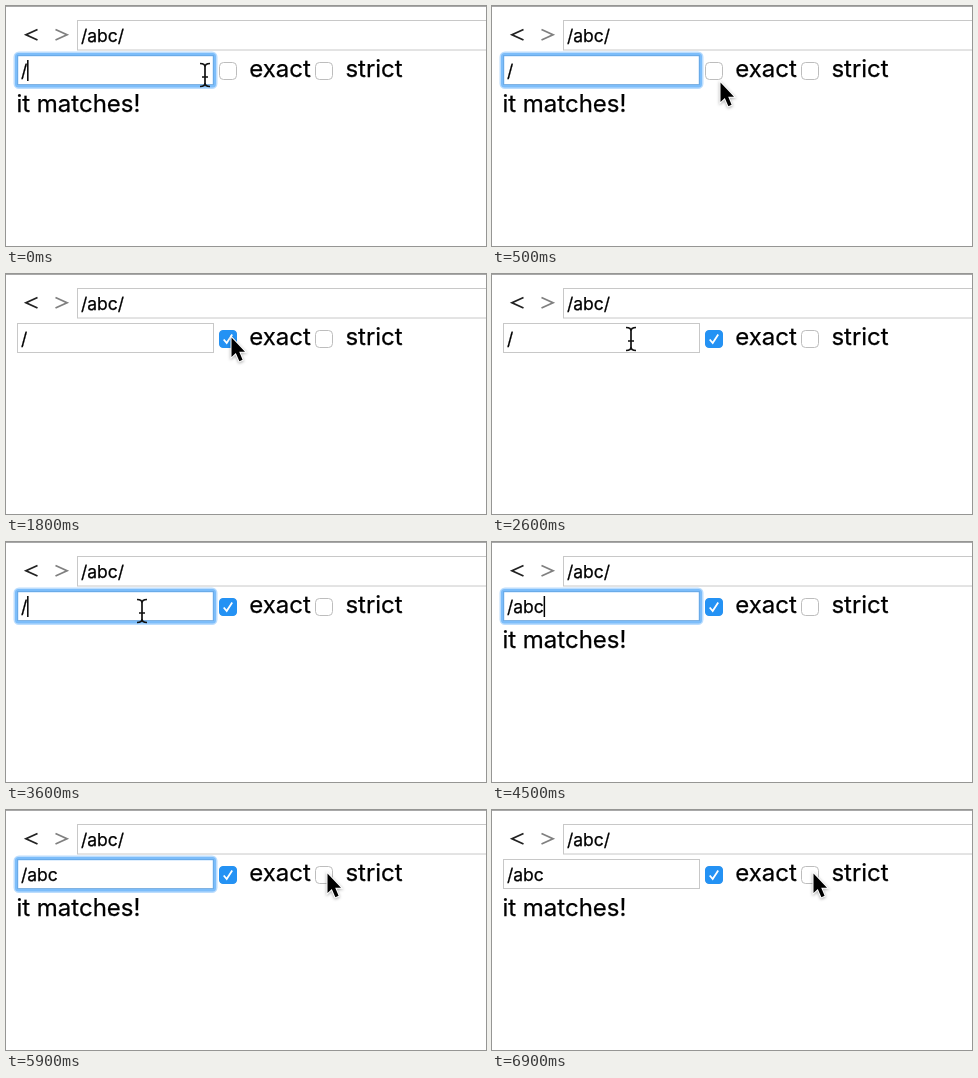
An HTML page that plays this animation: 480 by 240 pixels, repeating every 7000 ms.

```html
<!DOCTYPE html>
<html lang="en">
<head>
<meta charset="utf-8">
<style>
  html, body { margin: 0; width: 100%; height: 100%; overflow: hidden; background: #fff; }
  svg { display: block; font: 24px Inter, "Open Sans", sans-serif; }
  text { stroke: #000; stroke-width: .25; }
  .field { font-size: 17.5px; }
  .box { fill: #fff; stroke: #c8c8c8; }
  .check { fill: #fff; stroke: #bdbdbd; }
  .line { fill: none; stroke-width: 1.8; }
  #ring rect { fill: none; stroke: #3f9ef8; }
  .on { fill: #2492f4; stroke: #2492f4; }
  #arrow { filter: drop-shadow(0 1.5px 1.5px #0005); }
</style>
</head>
<body>
<svg width="480" height="240" viewBox="0 0 480 240">
  <path d="M0 .5H480" stroke="#a8a8a8"/>
  <path class="line" d="M31.5 23.5L20 28.7L31.5 34" stroke="#222"/>
  <path class="line" d="M49.5 23.5L61 28.7L49.5 34" stroke="#808080"/>
  <rect class="box" x="71.5" y="14.5" width="420" height="29.5"/>
  <text class="field" x="74.9" y="36">/abc/</text>

  <rect class="box" x="11.5" y="49.5" width="196" height="29"/>
  <g id="ring">
    <rect x="10" y="48" width="199" height="32.5" rx="3" stroke-width="5" opacity=".35"/>
    <rect x="10.5" y="48.5" width="198" height="31.5" rx="2" stroke-width="3" opacity=".5"/>
  </g>
  <text class="field" id="value" x="14.9" y="71"></text>
  <path id="caret" stroke="#000" stroke-width="1.5"/>

  <rect class="check" x="213.5" y="56.5" width="17" height="17" rx="4"/>
  <rect class="check" x="309.5" y="56.5" width="17" height="17" rx="4"/>
  <g id="exact">
    <rect class="on" x="213.5" y="56.5" width="17" height="17" rx="3.5"/>
    <path class="line" d="M217.7 65.5L220.7 69L226.2 60.5" stroke="#fff"/>
  </g>
  <g id="strict">
    <rect class="on" x="309.5" y="56.5" width="17" height="17" rx="3.5"/>
    <path class="line" d="M313.7 65.5L316.7 69L322.2 60.5" stroke="#fff"/>
  </g>
  <text x="243.3" y="71">exact</text>
  <text x="339.4" y="71">strict</text>
  <text id="match" x="10.4" y="106">it matches!</text>

  <g id="arrow">
    <path d="M.5 1.5V21L4.8 17L8.4 25.2L11.6 23.8L8.2 15.8H14Z"
      stroke="#fff" stroke-width="2" paint-order="stroke"/>
  </g>
  <g id="beam" fill="none">
    <path id="stem" d="M-5-11.5Q0-11.5 0-8Q0-11.5 5-11.5M0-8V8M-5 11.5Q0 11.5 0 8Q0 11.5 5 11.5M-3 2H3"/>
    <use href="#stem" stroke="#111" stroke-width="1.7"/>
  </g>
</svg>
<script>
const LOOP = 7000, TICK = 100, BLINK = 500;
const $ = id => document.getElementById(id);
const show = (id, on) => $(id).style.display = on ? "" : "none";
const within = (t, a, b) => t >= a && t < b;

// time, x, y, cursor shape
const path = [
  [0, 199, 69, "beam"], [100, 199, 69, "beam"], [300, 207, 71, "beam"],
  [400, 218, 74, "arrow"], [600, 238, 76, "arrow"], [800, 233, 72, "arrow"],
  [900, 233, 72, "arrow"], [1200, 225, 62, "arrow"], [2300, 225, 62, "arrow"],
  [2400, 190, 64, "beam"], [2600, 139, 65, "beam"], [2900, 139, 65, "beam"],
  [3200, 136, 69, "beam"], [3800, 136, 69, ""], [4700, 136, 69, ""],
  [4800, 160, 71, "beam"], [5000, 262, 80, "arrow"], [5200, 326, 80, "arrow"],
  [5300, 326, 80, "arrow"], [5800, 321, 62, "arrow"], [LOOP, 321, 62, "arrow"]
];

function pointer(t) {
  const i = path.findIndex(k => k[0] > t) - 1;
  const [t0, x0, y0, shape] = path[i], [t1, x1, y1] = path[i + 1];
  const p = (t - t0) / (t1 - t0);
  return { x: x0 + (x1 - x0) * p, y: y0 + (y1 - y0) * p, shape };
}

function caretOn(t) {
  if (t < 1600) return (t + 300) % (2 * BLINK) < BLINK;
  if (within(t, 3200, 3800)) return t < 3200 + BLINK;
  if (within(t, 3800, 4400)) return true;
  return within(t, 4400, 6000) && (t - 4400) % (2 * BLINK) < BLINK;
}

function draw(now) {
  const t = Math.floor(now % LOOP / TICK) * TICK;
  const typed = [3800, 4100, 4400].filter(k => t >= k).length;
  const strict = within(t, 6000, 6800);
  $("value").textContent = "/" + "abc".slice(0, typed);
  show("ring", t < 1600 || within(t, 3100, 6000));
  show("exact", t >= 1700);
  show("strict", strict);
  show("match", t < 1700 || typed === 3 && !strict);
  show("caret", caretOn(t));
  const end = 15.5 + $("value").getComputedTextLength();
  $("caret").setAttribute("d", `M${end} 54V75`);
  const { x, y, shape } = pointer(t);
  for (const id of ["arrow", "beam"]) {
    show(id, id === shape);
    $(id).setAttribute("transform", `translate(${x} ${y})`);
  }
  requestAnimationFrame(draw);
}
requestAnimationFrame(draw);
</script>
</body>
</html>
```
